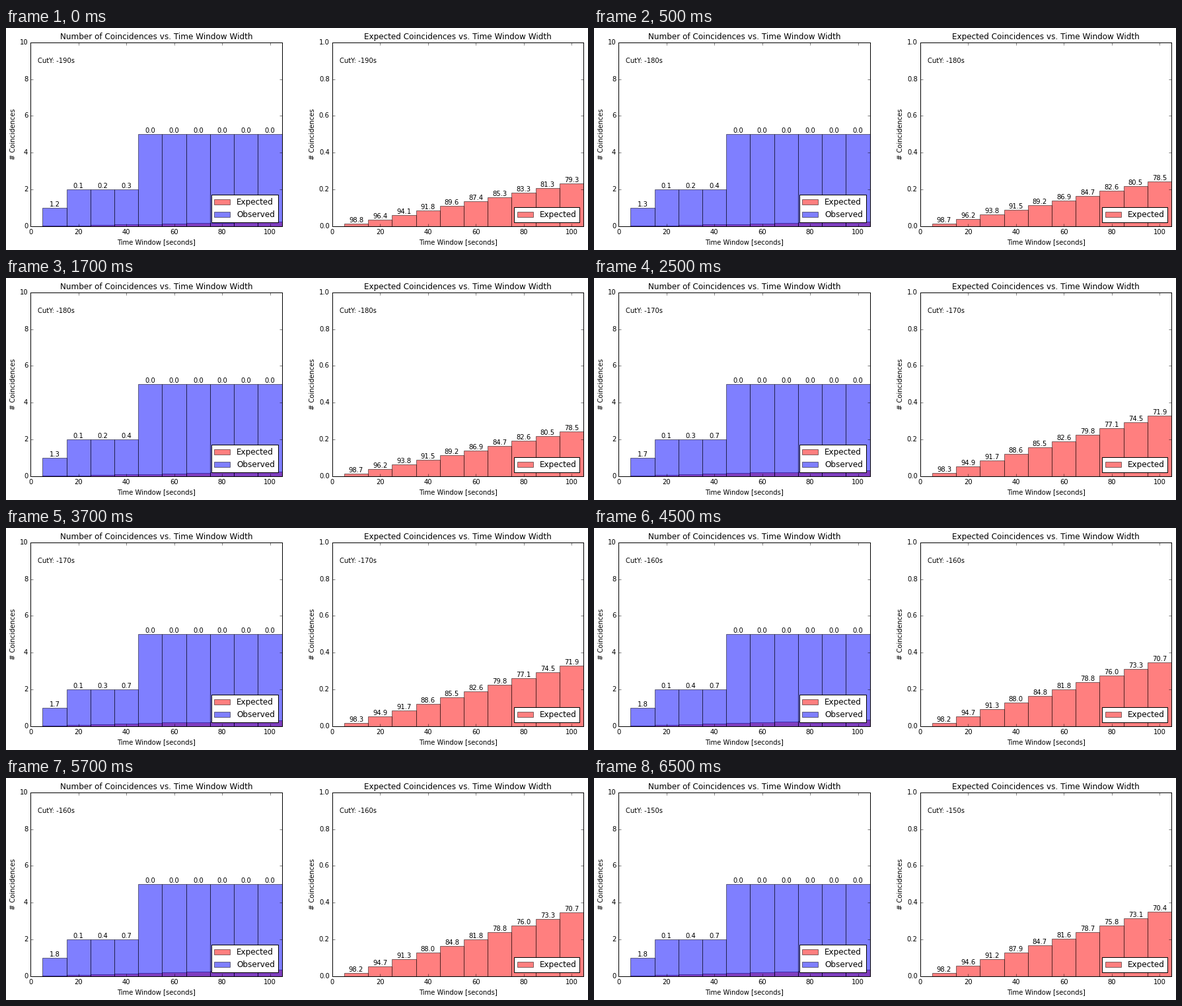
A matplotlib script for the animation above (8 s loop, 881 px wide and 337 px high).

```python
import math

import matplotlib.pyplot as plt
import numpy as np
from matplotlib.animation import FuncAnimation

W, H, DPI = 881, 337, 72
FRAME_MS, LOOP_MS, STEP_MS = 500, 8000, 2000
FIRST_STEP_MS = 500

WINDOWS = np.arange(10, 101, 10)
OBSERVED = np.where(WINDOWS < 45, np.where(WINDOWS < 15, 1, 2), 5)
# Expected coincidences per second of window for each cut.
RATES = [0.00244, 0.00255, 0.00347, 0.003657, 0.00369]
FIRST_CUT = -190

plt.style.use("classic")
plt.rcParams.update({
    "font.family": "DejaVu Sans",
    "font.size": 10,
    "figure.facecolor": "white",
    "savefig.dpi": "figure",
})


def make_axes(left, title, top):
    ax = fig.add_axes([left / W, 36.19 / H, 380.4545 / W, 279 / H])
    ax.set_title(title)
    ax.set_xlabel("Time Window [seconds]")
    ax.set_ylabel("# Coincidences")
    ax.set_xlim(0, 105)
    ax.set_ylim(0, top)
    ax.set_xticks(range(0, 101, 20))
    ax.set_yticks(np.linspace(0, top, 6))
    return ax


def make_bars(ax, heights, color, label):
    return ax.bar(WINDOWS, heights, width=10, align="center", color=color,
                  edgecolor="k", linewidth=1, alpha=0.5, label=label)


def make_labels(ax, heights):
    return [ax.text(x, y, "", ha="center", va="bottom")
            for x, y in zip(WINDOWS, heights)]


def poisson(k, mean):
    return math.exp(-mean) * mean ** k / math.factorial(k)


fig = plt.figure(figsize=((W + 1e-6) / DPI, (H + 1e-6) / DPI), dpi=DPI)
count_ax = make_axes(37.2, "Number of Coincidences vs. Time Window Width", 10)
expect_ax = make_axes(37.2 + 456.5455,
                      "Expected Coincidences vs. Time Window Width", 1)

start = RATES[0] * (WINDOWS - 5)
expected_bars = [make_bars(ax, start, "r", "Expected")
                 for ax in (count_ax, expect_ax)]
make_bars(count_ax, OBSERVED, "b", "Observed")

count_labels = make_labels(count_ax, OBSERVED)
expect_labels = make_labels(expect_ax, start)
cut_texts = [ax.text(3, 0.888 * ax.get_ylim()[1], "")
             for ax in (count_ax, expect_ax)]
for axes in (count_ax, expect_ax):
    axes.legend(loc="lower right")


def update(frame):
    step = (frame * FRAME_MS + STEP_MS - FIRST_STEP_MS) // STEP_MS
    expected = RATES[step] * (WINDOWS - 5)
    for bars in expected_bars:
        for bar, height in zip(bars, expected):
            bar.set_height(height)
    for label, k, mean in zip(count_labels, OBSERVED, expected):
        label.set_text(f"{100 * poisson(int(k), mean):.1f}")
    for label, mean in zip(expect_labels, expected):
        label.set_y(mean)
        label.set_text(f"{100 * poisson(0, mean):.1f}")
    for text in cut_texts:
        text.set_text(f"CutY: {FIRST_CUT + 10 * step}s")
    return []


update(0)
anim = FuncAnimation(fig, update, frames=LOOP_MS // FRAME_MS,
                     interval=FRAME_MS, repeat=True, repeat_delay=0)
plt.show()
```
